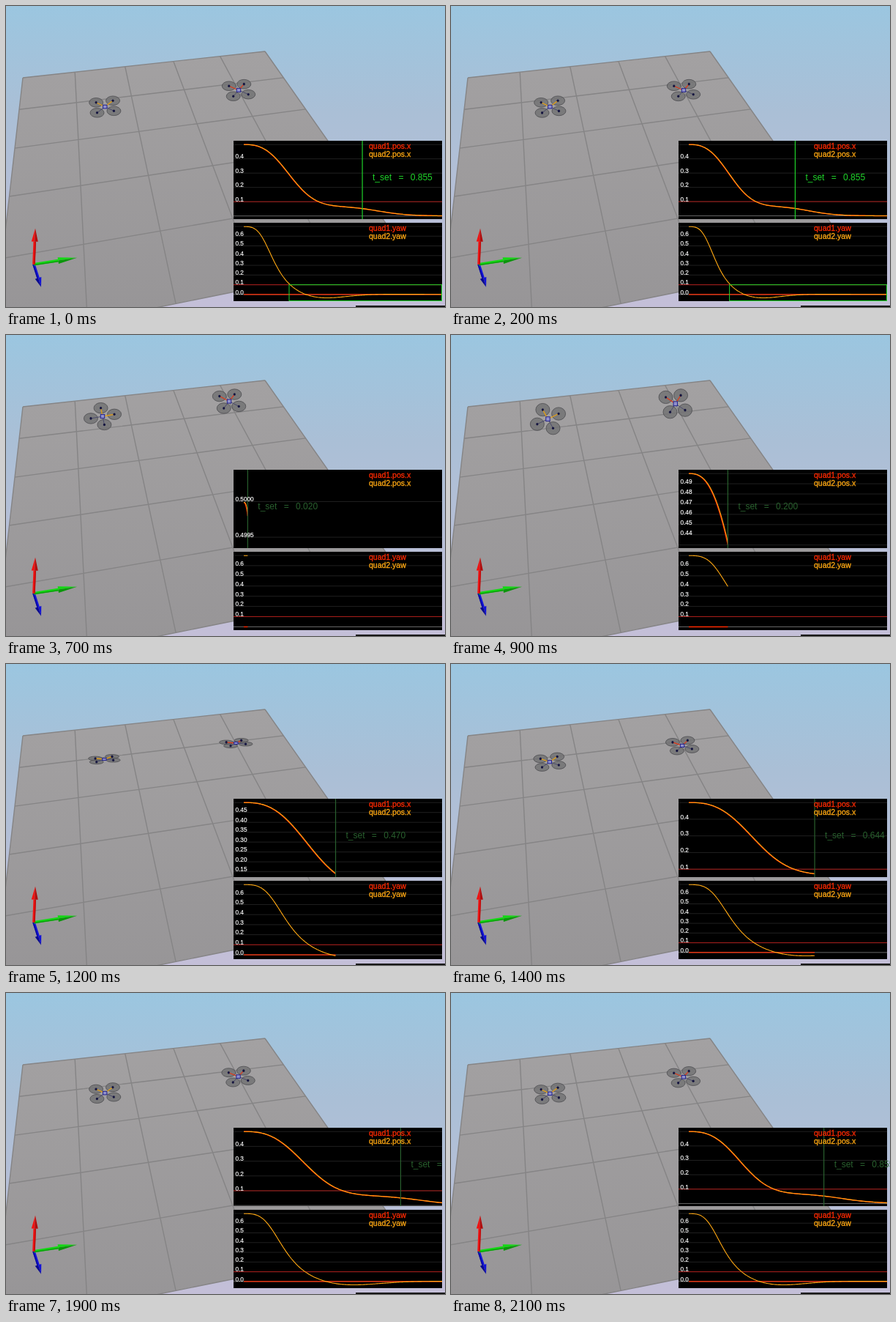
Recreate the animation shown at these times as an HTML page. Size 600x411 px, loop 2.2 s.

```html
<!DOCTYPE html>
<html lang="en">
<head>
<meta charset="utf-8">
<title>Quadrotor simulation</title>
<style>
html, body { margin: 0; width: 100%; height: 100%; overflow: hidden; }
svg { display: block; width: 600px; height: 411px; }
text { font-family: "Liberation Sans", Arial, sans-serif; }
.tick { font-size: 8.2px; fill: #fff; stroke: #fff; stroke-width: .2px; }
.legend { font-size: 10.5px; stroke: currentColor; stroke-width: .3px; fill: currentColor; }
.settle { font-size: 12px; word-spacing: 6px; fill: currentColor; }
</style>
</head>
<body>
<svg viewBox="0 0 600 411">
  <defs>
    <linearGradient id="sky" x2="0" y2="1">
      <stop stop-color="#9bc6e0"/><stop offset=".35" stop-color="#aabfd6"/><stop offset="1" stop-color="#c4bfd8"/>
    </linearGradient>
    <linearGradient id="shade" x2="0" y2="1">
      <stop stop-color="#a3a1a2"/><stop offset="1" stop-color="#969496"/>
    </linearGradient>
  </defs>
  <rect width="600" height="411" fill="url(#sky)"/>
  <path id="floor" fill="url(#shade)"/>
  <path id="grid" fill="none" stroke="#858485" stroke-width="1.4"/>
  <rect x="478" y="409" width="122" height="2" fill="#181818"/>
  <g id="axes"></g>
  <g id="quads"></g>
  <g id="plots"></g>
</svg>
<script>
const FRAME = 100, COUNT = 22, START = 7, TILES = 5;
const SETTLE = 0.855, YAW_SETTLE = 0.327, LIMIT = 0.1;
const PANEL = { left: 311, right: 596, height: 107 };
const ORIGIN = 325, WIDTH = 271, MIN_SPAN = 1.015, SAMPLES = 150;
const RED = '#ff2a00', ORANGE = '#ffa812', GREEN = '#1fd52a', DARK_GREEN = '#29602e';
const $ = id => document.getElementById(id);

// Simulated seconds by frames since the restart
const clock = [[0, .02], [5, .47], [14, 1.255], [15, 1.43], [21, 1.92]];
function simTime(n) {
  const i = clock.findIndex(([end], k) => k && n <= end);
  const [[n0, t0], [n1, t1]] = [clock[i - 1], clock[i]];
  return t0 + (t1 - t0) * (n - n0) / (n1 - n0);
}

// Fast fall, then a slow second settling step
const pos = t => .43 * Math.exp(-((t / .381) ** 2.75)) + .07 / (1 + Math.exp((t - .97) / .11));
// Fall with a shallow overshoot below zero
const yaw = t => .7 / (1 + (t / .222) ** 3.4) - .063 * Math.exp(-(((t - .52) / .27) ** 2));
const acceleration = (t, h = .02) => (pos(t + h) - 2 * pos(t) + pos(Math.abs(t - h))) / (h * h);

const line = (x1, y1, x2, y2, color, width = 1) =>
  `<path d="M${x1} ${y1}L${x2} ${y2}" stroke="${color}" stroke-width="${width}" fill="none"/>`;
const label = (x, y, cls, color, text) => `<text x="${x}" y="${y}" class="${cls}" color="${color}">${text}</text>`;

// Perspective map of the unit square onto four corners
function perspective([x0, y0], [x1, y1], [x2, y2], [x3, y3]) {
  const sx = x0 - x1 + x2 - x3, sy = y0 - y1 + y2 - y3;
  const ax = x1 - x2, ay = y1 - y2, bx = x3 - x2, by = y3 - y2;
  const det = ax * by - bx * ay, g = (sx * by - bx * sy) / det, h = (ax * sy - sx * ay) / det;
  const map = (a, b, d, u, v) => (a + (b - a + g * b) * u + (d - a + h * d) * v) / (1 + g * u + h * v);
  return (u, v) => `${map(x0, x1, x3, u, v)} ${map(y0, y1, y3, u, v)}`;
}

function drawFloor() {
  const at = perspective([23, 98], [354, 62], [551, 342], [-18, 457]);
  let d = '';
  for (let i = 0; i <= TILES; i++) {
    const s = i / TILES;
    d += `M${at(s, 0)}L${at(s, 1)}M${at(0, s)}L${at(1, s)}`;
  }
  $('grid').setAttribute('d', d);
  $('floor').setAttribute('d', `M${at(0, 0)}L${at(1, 0)}L${at(1, 1)}L${at(0, 1)}Z`);
}

function arrow(dx, dy, head, color, shade) {
  const x = 38, y = 352.7, len = Math.hypot(dx, dy), ux = dx / len, uy = dy / len;
  const bx = x + dx - ux * head, by = y + dy - uy * head, w = 4.5;
  const cone = side => `M${bx + uy * w * side} ${by - ux * w * side}L${x + dx} ${y + dy}L${bx} ${by}Z`;
  return line(x, y, bx, by, color, 3.6) + line(x - uy, y + ux, bx - uy, by + ux, shade, 1.2)
    + `<path d="${cone(1)}" fill="${color}"/><path d="${cone(-1)}" fill="${shade}"/>`;
}

// rest: place at pos 0; drift: shift per unit of pos; span, skew: projected body axes
function quad({ color, rest, drift, span, skew, heading }, t) {
  const [x, y] = rest.map((r, i) => r + drift[i] * pos(t));
  const pitch = Math.sin(.73 - .1 * acceleration(t));
  const rotors = [5, 7, 3, 1].map(k => {
    const a = k * Math.PI / 4 + heading(t), c = Math.cos(a), s = Math.sin(a);
    return [x + span * c + skew * s, y - 1.8 * c + 15 * pitch * s];
  });
  const discs = rotors.map(([a, b]) =>
    `<ellipse cx="${a}" cy="${b}" rx="9.5" ry="${1 + 8 * pitch}" fill="#707072" fill-opacity=".8" stroke="#4c4c50" stroke-width=".8"/>`);
  const arms = rotors.map(([a, b], i) => i < 2 ? line(x, y, a, b, color, 1.2) : line(x, y, a, b, '#4c4c6c', 1));
  const motors = rotors.map(([a, b]) => `<ellipse cx="${a}" cy="${b}" rx="1.6" ry="1.8" fill="#15153f"/>`);
  const h = 1 + 2 * pitch;
  return discs.join('') + arms.join('') + motors.join('')
    + `<rect x="${x - 2.7}" y="${y - h}" width="5.4" height="${2 * h}" fill="#9090cc" stroke="#22228c"/>`;
}

const quads = [
  { color: '#e8a010', rest: [135.3, 137.6], drift: [-6.6, -53], span: 16.2, skew: 1, heading: yaw },
  { color: '#e03818', rest: [318, 115], drift: [-26, -49], span: 14.5, skew: 4.2, heading: () => 0 }
];

function plot({ top, name, first, second, marks }, t) {
  const { left, right, height } = PANEL, bottom = top + height;
  const times = Array.from({ length: SAMPLES + 1 }, (_, i) => t * i / SAMPLES);
  const values = times.flatMap(s => [first(s), second(s)]);
  let lo = Math.min(...values), hi = Math.max(...values);
  const pad = Math.max(0, .001 - (hi - lo)) / 2;
  lo -= pad;
  hi += pad;

  const px = s => ORIGIN + s * WIDTH / Math.max(t, MIN_SPAN);
  const py = v => top + 5.2 + (hi - v) / (hi - lo) * 97.3;
  const trace = (fn, color, width) =>
    `<polyline points="${times.map(s => `${px(s).toFixed(2)},${py(fn(s)).toFixed(2)}`).join(' ')}" fill="none" stroke="${color}" stroke-width="${width}"/>`;

  const step = [.0005, .002, .005, .01, .02, .05, .1, .2].find(s => (hi - lo) / s <= 7.35);
  const digits = Math.min(4, Math.ceil(-Math.log10(step) - 1e-6));
  let grid = '', ticks = '';
  for (let i = Math.ceil(lo / step) - 1; i * step < hi + step; i++) {
    const y = py(i * step);
    if (y < top || y > bottom) continue;
    grid += line(left, y, right, y, i ? '#202020' : '#666');
    if (y > top + 9 && y < bottom - 5.5) ticks += label(313.5, y - .2, 'tick', '#fff', Math.abs(i * step).toFixed(digits));
  }
  // The nested svg clips the traces to the panel
  return `<svg x="${left}" y="${top}" width="${right - left}" height="${height}" viewBox="${left} ${top} ${right - left} ${height}">`
    + `<rect x="${left}" y="${top}" width="100%" height="100%"/>` + grid
    + line(left, py(LIMIT), right, py(LIMIT), '#ac1c18')
    + trace(first, RED, 1.4) + trace(second, ORANGE, 1.1) + marks(px, py) + '</svg>' + ticks
    + label(496, top + 11, 'legend', RED, 'quad1.' + name)
    + label(496, top + 22, 'legend', ORANGE, 'quad2.' + name);
}

function plots(t) {
  const settled = t > 1.3, color = settled ? GREEN : DARK_GREEN;
  const seen = Math.min(t, SETTLE), x = ORIGIN + seen * WIDTH / Math.max(t, MIN_SPAN);
  const posPlot = {
    top: 184, name: 'pos.x', first: s => pos(s + .003), second: pos,
    marks: () => line(x, 184, x, 291, color, 1.2)
  };
  const yawPlot = {
    top: 296, name: 'yaw', first: () => 0, second: yaw,
    marks: (px, py) => settled
      ? `<rect x="${px(YAW_SETTLE)}" y="${py(LIMIT)}" width="${PANEL.right - .5 - px(YAW_SETTLE)}" height="${402.5 - py(LIMIT)}" fill="none" stroke="${GREEN}"/>`
      : ''
  };
  return plot(posPlot, t) + plot(yawPlot, t)
    + label(x + 14, 238, 'settle', color, `t_set = ${seen.toFixed(3)}`);
}

function draw(index) {
  const t = simTime((index - START + COUNT) % COUNT);
  $('quads').innerHTML = quads.map(q => quad(q, t)).join('');
  $('plots').innerHTML = plots(t);
}

drawFloor();
$('axes').innerHTML = arrow(10, 31, 13, '#1212d8', '#080890')
  + arrow(59, -9, 26, '#14d814', '#0b960b')
  + arrow(2, -49, 18, '#f01212', '#b00c0c');

const begin = performance.now();
let shown = -1;
function tick() {
  const index = Math.floor((performance.now() - begin) / FRAME) % COUNT;
  if (index !== shown) draw(shown = index);
  requestAnimationFrame(tick);
}
tick();
</script>
</body>
</html>
```
